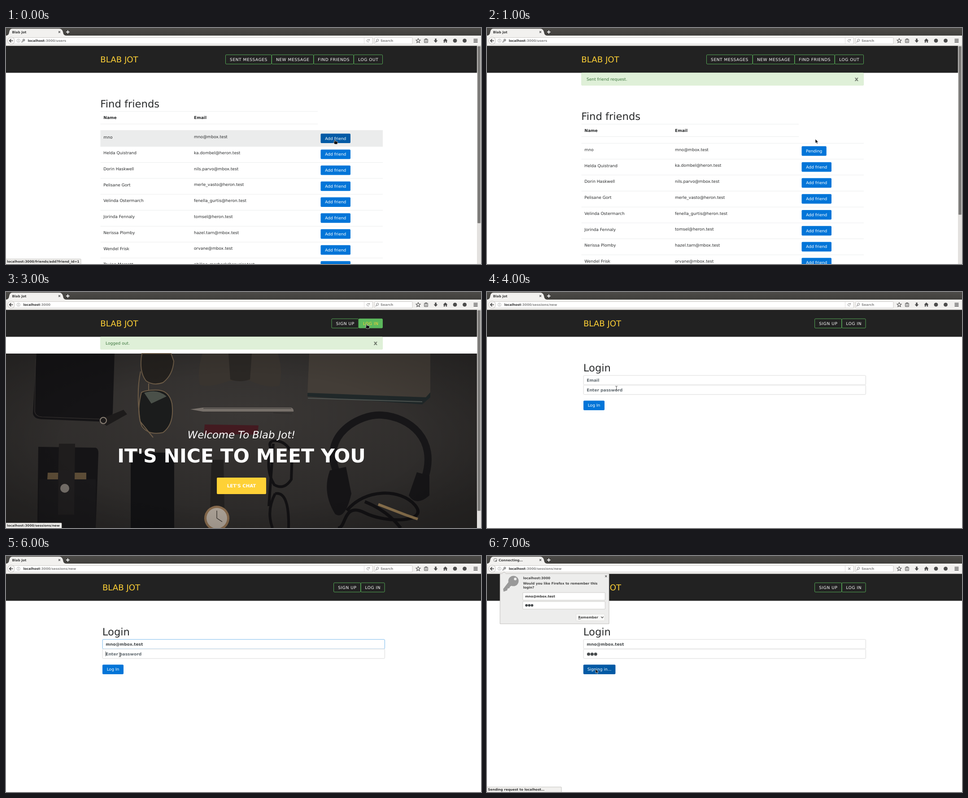
Write an HTML page that moves like this. It is 1059 px wide and 529 px high and loops after 8000 ms.

```html
<!DOCTYPE html>
<html lang="en">
<head>
<meta charset="utf-8">
<title>Blab Jot</title>
<style>
html, body { margin: 0; width: 100%; height: 100%; overflow: hidden; background: #fff; }
svg { display: block; width: 1059px; height: 529px; font-family: "DejaVu Sans", sans-serif; text-rendering: geometricPrecision; }
.b { font-weight: bold; }
</style>
</head>
<body>
<svg id="stage" viewBox="0 0 1059 529" xmlns="http://www.w3.org/2000/svg"></svg>
<script>
const REM = 9.1, UI = 7.3, STEP = 1000;
const BLUE = '#0275d8', DEEP = '#025aa5', GREEN = '#5cb85c', GOLD = '#fed136', INK = '#292b2c';
const BRAND = 'Blab Jot', EMAIL = 'mno@mbox.test';

const people = [
  ['mno', EMAIL],
  ['Helda Quistrand', 'ka.dombel@heron.test'],
  ['Dorin Haskwell', 'nils.parvo@mbox.test'],
  ['Pelisane Gort', 'merle_vasto@heron.test'],
  ['Velinda Ostermarch', 'fenella_gurtis@heron.test'],
  ['Jorinda Fennaly', 'tomsel@heron.test'],
  ['Nerissa Plomby', 'hazel.tarn@mbox.test'],
  ['Wendel Frisk', 'orvane@mbox.test'],
  ['Tavian Morcott', 'philine_marbeck@courier.test']
];

// Drawing helpers
const rect = (x, y, w, h, fill, more = '') =>
  `<rect x="${x}" y="${y}" width="${w}" height="${h}" fill="${fill}" ${more}/>`;
const path = (d, fill, more = '') => `<path d="${d}" fill="${fill}" ${more}/>`;
const line = (d, color, width = 1, more = '') =>
  path(d, 'none', `stroke="${color}" stroke-width="${width}" ${more}`);
const dot = (x, y, r, fill, more = '') => `<circle cx="${x}" cy="${y}" r="${r}" fill="${fill}" ${more}/>`;
const text = (x, y, str, fill = INK, size = REM, more = '') =>
  `<text x="${x}" y="${y}" font-size="${size}" fill="${fill}" ${more}>${str}</text>`;
const bold = (x, y, str, fill, size, more = '') => text(x, y, str, fill, size, 'class="b" ' + more);
const at = (x, y, body) => `<g transform="translate(${x} ${y})">${body}</g>`;
const MID = 'text-anchor="middle"';

// Pointers, with the hot spot at the origin
const arrow = (x, y) => at(x, y, path('M0 0V9.2L2.2 7.3 3.8 10.6 5.3 9.9 3.8 6.7H6.8Z', '#111', 'stroke="#fff" stroke-width=".6"'));
const hand = (x, y) => at(x, y, path('M-1 0Q0-1 1 0V3L6 4Q7 5 6.4 7L5.4 10H0L-3 6.2Q-3.2 5-1.8 5L-1 5.8Z', '#111', 'stroke="#fff" stroke-width=".6"'));
const beam = (x, y) => at(x, y, line('M-2.5-4.5Q0-4.5 0-3.5Q0-4.5 2.5-4.5M0-4V4M-2.5 4.5Q0 4.5 0 3.5Q0 4.5 2.5 4.5', '#444', .9));

const smallKey = (x, y) => at(x, y,
  line('M-3.5 3.7L1 -.8', '#777', 1.5) + line('M-2.5 2.7L-1.2 4', '#777') + dot(1.6, -1.4, 1.9, 'none', 'stroke="#777" stroke-width="1.5"'));

function browser({ title = BRAND, url = '', key, busy }) {
  const x = key ? 48.5 : 38.5, gray = '#4c4c4c';
  let s = rect(0, 0, 1059, 17, 'url(#bar)') + rect(0, 17, 1059, 23, '#f2f1ef') + rect(0, 39.4, 1059, .8, '#b9b6b2');
  s += path('M0 17Q6 17 7 10Q8 1.5 14 1.5H119Q125 1.5 127 9Q128 17 134 17Z', '#f2f1ef');
  if (busy) s += dot(18.5, 9, 3.4, 'none', 'stroke="#999" stroke-width="1.2"') + dot(20.3, 11, 1.4, '#555');
  s += bold(busy ? 26 : 13.5, 11.6, title, '#3c3c3c', UI);
  s += line('M117 7l4 4m0-4l-4 4', '#555', 1.2) + line('M134 9h7.5M137.75 5.2v7.5', '#f4f4f4', 1.8);
  s += rect(13, 21.5, 804.5, 14.4, '#fff', 'rx="1.5" stroke="#c4c1bd" stroke-width=".8"');
  s += dot(11.5, 28.5, 8, '#f7f6f5', 'stroke="#b5b2ae" stroke-width=".8"');
  s += line('M15.5 28.5H8M11.3 24.9L7.7 28.5l3.6 3.6', '#444', 1.6);
  s += dot(27.7, 28.5, 3.7, 'none', 'stroke="#999" stroke-width=".7"') + line('M27.7 27.8v2.6M27.7 26v1', '#888', .9);
  if (key) s += smallKey(38, 28.5);
  s += bold(x, 31.2, `localhost<tspan fill="#8a8a8a">:3000${url}</tspan>`, '#333', UI);
  s += line('M798.5 22v13.5', '#d4d2cf', .7);
  s += busy ? line('M805.3 26l5 5m0-5l-5 5', '#888', 1.1)
    : line('M809.6 30.2A2.8 2.8 0 1 1 809.4 26.6M810.4 24.8v2.6h-2.6', '#777', .9);
  s += rect(822, 21.5, 84, 14.4, '#fff', 'rx="1.5" stroke="#c4c1bd" stroke-width=".8"');
  s += dot(828.4, 27.4, 2.4, 'none', 'stroke="#777" stroke-width="1"') + line('M826.6 29.3l-2.4 2.7', '#777', 1.2);
  s += bold(835, 31.2, 'Search', '#8a8a8a', UI);
  s += path('M919 23.6l1.4 3.2 3.5.3-2.7 2.3.8 3.4-3-1.8-3 1.8.8-3.4-2.7-2.3 3.5-.3Z', 'none', `stroke="${gray}" stroke-width="1.1"`);
  s += rect(932.8, 25.2, 7.4, 7.6, 'none', `rx=".8" stroke="${gray}" stroke-width="1.1"`) + rect(934.6, 23.8, 3.8, 2.4, gray);
  s += line('M934.5 28.3h4M934.5 30.6h4', gray, .9);
  s += path('M956.3 23.8h3.4v4h2.8L958 33l-4.5-5.2h2.8Z', gray);
  s += path('M979.5 23.4l5 4.8h-1.4v4.6h-2.5v-3h-2.2v3h-2.5v-4.6h-1.4Z', gray);
  s += dot(1001, 28.4, 4.4, gray) + dot(1022.5, 28.4, 4.4, gray);
  return s + line('M1042.5 25.2h9M1042.5 28.4h9M1042.5 31.6h9', gray, 1.6);
}

const scrollbar = end => rect(1050, 40, 9, 489, '#e3e1df') + rect(1051.2, 41, 6.6, end - 41, '#7c7b79', 'rx="1"');

function status(str, w) {
  return rect(-1, 517.8, w, 12, '#f1f0ee', 'rx="1" stroke="#b8b6b3" stroke-width=".8"') + bold(2, 526.2, str, '#333', UI);
}

// links: [label, left, right, active]
function navbar(links, dx = 0) {
  let s = rect(0, 40, 1059, 60.4, '#222') + text(210.3 + dx, 76.8, BRAND.toUpperCase(), GOLD, 18.15);
  for (const [label, l, r, active] of links)
    s += rect(l + .5 + dx, 60, r - l - .5, 20.8, active ? GREEN : 'none', `rx="1.8" stroke="${GREEN}" stroke-width=".9"`)
      + text((l + r) / 2 + .5 + dx, 73.9, label, active ? GOLD : '#fff', REM, MID + ' letter-spacing=".55"');
  return s;
}
const memberNav = () => navbar([['SENT MESSAGES', 489, 592], ['NEW MESSAGE', 592, 685.5], ['FIND FRIENDS', 685.5, 775], ['LOG OUT', 775, 839.5]]);
const guestNav = (dx, hot) => navbar([['SIGN UP', 725.5, 786], ['LOG IN', 786, 839.5, hot]], dx);

const notice = str => rect(210.6, 100.4, 629, 28.2, '#dff0d8', 'stroke="#d0e9c6" stroke-width=".6" rx="1.5"')
  + text(222, 118.2, str, '#3c763d') + bold(824, 119.2, 'x', '#6f786c', 13.6, MID);

const button = (x, y, w, label, hot) => rect(x, y, w, 21.4, hot ? DEEP : BLUE, 'rx="2"')
  + text(x + w / 2, y + 13.8, label, '#fff', REM, MID);

function friends(dy, hover, pending) {
  const rule = (y, end) => rect(210.5, y, end - 210.5, .7, '#e3e5e6');
  let s = text(210.3, 177.6, 'Find friends', INK, 22.7) + rule(186.6, 695) + rule(214.8, 695);
  s += bold(217.3, 204.3, 'Name') + bold(419, 204.3, 'Email');
  people.forEach(([name, mail], i) => {
    const y = 229.5 + 35.73 * i;
    if (i === hover) s += rect(210.5, y, 629.5, 35.7, '#ebecec');
    s += rule(y, 840) + text(217.3, y + 18, name) + text(419, y + 17.8, mail);
    s += i === 0 && pending ? button(701.5, y + 7.2, 55.3, 'Pending') : button(701.5, y + 7.2, 66.5, 'Add friend', i === hover);
  });
  return at(0, dy, s);
}

function hero() {
  const dark = '#151416', brown = '#6d5c47';
  let s = rect(0, 138, 1050, 391, 'url(#desk)');
  // wallet
  s += path('M68 138L60 272Q62 284 78 285L222 291Q236 288 238 270L242 138Z', dark);
  s += line('M66 150L64 268Q66 279 80 280L214 285', '#3b3735', 1.2) + path('M208 286l54-22 8 10-46 26Z', '#1d1b1b');
  s += dot(217, 288, 7, 'none', 'stroke="#8b8176" stroke-width="2"');
  // sunglasses
  s += path('M303 138Q296 178 312 199Q328 211 350 203Q372 186 374 155L368 138Z', '#24211e', `stroke="${brown}" stroke-width="2"`);
  s += path('M302 225Q290 270 303 301Q318 322 350 315Q376 296 370 250Q364 222 340 220Q315 219 302 225Z', '#1b1c1c', `stroke="${brown}" stroke-width="2"`);
  s += path('M308 226Q338 216 358 234L324 250Z', '#4a5049') + line('M300 178Q290 225 299 290L328 326M318 205v15', brown, 2);
  // bow tie
  s += path('M438 138Q426 175 432 208Q452 216 498 199L542 198Q582 217 610 210Q618 175 606 138Z', '#39342f');
  s += path('M496 138L500 196Q520 204 544 196L548 138Z', '#2a2724');
  // books
  s += path('M676 138L672 234L928 252L946 236V138Z', '#202829') + path('M676 138L672 226L936 236L946 225V138Z', '#433d37');
  s += line('M673 238L928 246', '#4f5551', 2);
  // pen and case
  s += path('M411 263l28-4H636q6 3 5 9H439Z', '#77706a') + line('M440 261H636M596 271l42 2', '#2a2827', 1.2);
  s += path('M443 297l120 2-2 21-120-2Z', '#431a20');
  // card holder and phone
  s += path('M72 347l128 2q6 2 6 12l-6 168H70Z', dark) + path('M93 405h86v16H92Z', '#5d4d37') + path('M118 340h36l-2 159h-38Z', '#1f1d1d');
  s += path('M74 420h126v109H72Z', '#19181a') + path('M117 400h36l-1 99h-36Z', '#201e1f') + dot(131, 440, 10, '#77716b');
  s += rect(278, 360, 97, 175, '#121214', 'rx="5"');
  // watch
  s += path('M458 376h27l2 110h-32Z', '#22201f') + dot(470, 507, 28, '#85694c') + dot(470, 507, 23, '#aaa095') + line('M470 490v17l12 8', '#312b27', 1.3);
  // spectacles
  s += line('M590 350Q578 400 598 432Q620 445 636 420L638 362Q622 330 594 334Q585 338 590 350M600 452Q580 490 594 529M600 452Q632 446 630 529M596 340L586 480', '#121113', 6);
  // headphones
  s += line('M738 405C700 320 790 272 838 276C900 280 962 330 934 416', '#171618', 16);
  s += path('M722 400l36-8 12 60q-14 60-36 46Q704 450 722 400Z', '#151416') + path('M916 404l28 8 0 44q-30 26-46 0Z', '#161517');
  s += line('M760 490C800 440 880 440 912 478S850 520 800 495S760 529 740 529M800 470Q850 490 880 529', '#121113', 7);
  s += line('M830 476L892 500M892 500l26 9', '#8d744f', 6);
  s += rect(0, 138, 1050, 391, 'url(#shade)');
  // headline
  s += text(525, 327.5, `Welcome To ${BRAND}!`, '#fff', 22.7, MID + ' font-style="italic"');
  s += bold(525, 381.6, "IT'S NICE TO MEET YOU", '#fff', 42.5, MID);
  return s + rect(470, 416, 110, 37, GOLD, 'rx="2"') + bold(525, 438.3, "LET'S CHAT", '#fff', 10.2, MID);
}

const bullets = (x, y, r, gap) => [0, 1, 2].map(i => dot(x + i * gap, y, r, '#464a4c')).join('');

// focus: index of the outlined field
function login({ mail, pass, focus, busy }) {
  const field = (y, on, value, hint) => rect(215.2, y, 629.2, 21.2, '#fff', `rx="2" stroke="${on ? '#66afe9' : '#d5d5d5'}" stroke-width=".9"`)
    + bold(222.2, y + 14, value || hint, value ? '#464a4c' : '#636c72');
  let s = rect(0, 100, 1059, 429, '#fff') + text(214.8, 177.6, 'Login', INK, 22.7);
  s += field(187, focus === 0, mail, 'Email') + field(208.6, focus === 1, pass ? ' ' : '', 'Enter password');
  if (pass) s += bullets(226.5, 220, 3.6, 7.8);
  return s + (busy ? button(214.8, 243.6, 71.6, 'Signing in...', true) : button(215, 243.6, 47, 'Log In'));
}

const suggestions = () => rect(213, 209, 633, 46, '#fff', 'stroke="#c8c6c3" stroke-width=".8"')
  + text(220, 222.5, EMAIL, '#333', 8.2) + text(220, 244.5, people[7][1], '#333', 8.2);

function savePrompt() {
  let s = path('M29 39.5H34L38 35.5 42 39.5H272V152H29Z', '#ededec', 'stroke="#b4b2af" stroke-width=".8"');
  s += dot(59, 56, 11.5, '#999') + dot(63, 51.5, 3, '#ededec') + path('M49 57l8 8-6 4-1 3-4 1-1 4-8 3-1-6Z', '#999');
  s += bold(80.5, 51.8, 'localhost:3000', '#444', UI);
  s += bold(80.5, 63.6, 'Would you like Firefox to remember this', '#444', UI) + bold(80.5, 72.8, 'login?', '#444', UI);
  for (const y of [82, 102]) s += rect(79.8, y, 183.5, 17, '#fff', 'rx="1" stroke="#c2c0bd" stroke-width=".8"');
  s += bold(85, 92.7, EMAIL, '#333', UI) + bullets(88, 110.6, 2.9, 6.2);
  s += rect(198.5, 130, 64, 15.2, '#f8f8f7', 'rx="1.5" stroke="#dad8d5" stroke-width=".7"');
  s += bold(203.3, 140.3, '<tspan text-decoration="underline">R</tspan>emember', '#444', UI);
  return s + line('M254.3 136l2.6 2.8 2.6-2.8', '#444', 1.2) + line('M263.3 43.3l4 4m0-4l-4 4', '#555', 1.1);
}

const users = { url: '/users', key: true }, fresh = { url: '/sessions/new' };
const sent = 'Sent friend request.';
const caret = (x, y) => line(`M${x} ${y}v11`, '#333', .8);

// One scene per step
const scenes = [
  friends(0, 0) + memberNav() + browser(users) + scrollbar(437.5) + status('localhost:3000/friends/add?friend_id=1', 168) + hand(733, 250.5),
  friends(28.4, -1, true) + memberNav() + notice(sent) + browser(users) + scrollbar(418.5) + arrow(732, 249),
  friends(28.4, 1, true) + memberNav() + notice(sent) + browser(users) + scrollbar(418.5) + status('localhost:3000/friends/add?friend_id=3', 168) + hand(734.5, 307.5),
  hero() + guestNav(0, true) + notice('Logged out.') + browser({}) + scrollbar(490.5) + status('localhost:3000/sessions/new', 125) + hand(804, 72),
  login({}) + guestNav(4.6) + browser(fresh) + beam(288.5, 215.5),
  login({ mail: EMAIL[0], focus: 0 }) + guestNav(4.6) + browser(fresh) + suggestions() + caret(232.5, 192) + arrow(254, 221),
  login({ mail: EMAIL, focus: 0 }) + guestNav(4.6) + browser(fresh) + caret(222.4, 213.8) + beam(254, 221.5),
  login({ mail: EMAIL, pass: true, busy: true }) + guestNav(4.6) + browser({ ...fresh, title: 'Connecting…', key: true, busy: true })
    + savePrompt() + status('Sending request to localhost…', 167) + arrow(242, 253.5)
];

const stop = (o, c, a = 1) => `<stop offset="${o}" stop-color="${c}" stop-opacity="${a}"/>`;
const stage = document.getElementById('stage');
stage.innerHTML = `<defs>
  <linearGradient id="bar" x2="0" y2="1">${stop(0, '#4d4b48')}${stop(1, '#403f3c')}</linearGradient>
  <radialGradient id="desk" cx=".5" cy=".35" r=".7">${stop(0, '#3a3735')}${stop(1, '#292726')}</radialGradient>
  <radialGradient id="shade" r=".75">${stop(.5, '#000', 0)}${stop(1, '#000', .25)}</radialGradient>
</defs>` + scenes.map(s => `<g display="none">${s}</g>`).join('');

const layers = [...stage.querySelectorAll(':scope > g')];
let shown = -1;
function tick() {
  const i = Math.floor(performance.now() / STEP) % layers.length;
  if (i !== shown) {
    layers.forEach((g, k) => g.setAttribute('display', k === i ? 'inline' : 'none'));
    shown = i;
  }
  requestAnimationFrame(tick);
}
tick();
</script>
</body>
</html>
```
